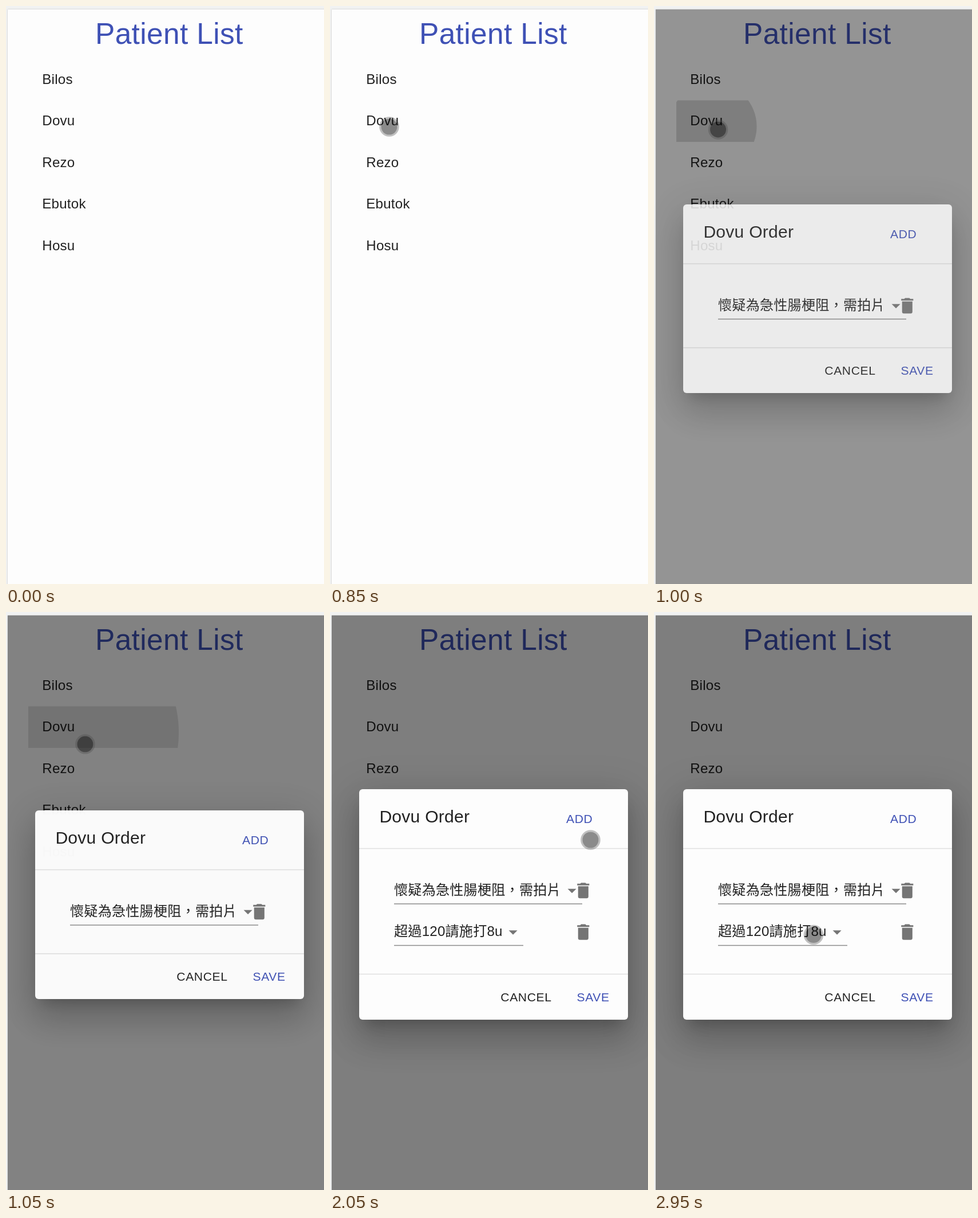
These frames come from a looping animation (556 by 1008 pixels, 3 s). An HTML page:

```html
<!DOCTYPE html>
<html lang="zh-Hant">
<head>
<meta charset="utf-8">
<title>Patient List</title>
<style>
  html, body { margin: 0; width: 100%; height: 100%; overflow: hidden; background: #f1f2f2; }
  body { position: relative; font-family: "Liberation Sans", "Noto Sans CJK TC", sans-serif; }
  svg { position: absolute; left: 0; top: 0; width: 556px; height: 1008px; overflow: visible; }
  #page, #backdrop { position: absolute; left: 2.5px; top: 5.5px; width: 600px; height: 1100px; }
  #page { background: #fdfdfd; box-shadow: 0 0 2px rgba(0,0,0,.25); }
  #backdrop { background: #000; }
  #dialog {
    position: absolute; left: 51px; width: 470px; border-radius: 6px; background: #fdfdfd;
    box-shadow: 0 16.6px 22.6px -10.5px rgba(0,0,0,.2), 0 36px 57px 4.5px rgba(0,0,0,.14),
      0 13.6px 69px 12px rgba(0,0,0,.12);
  }
  text { white-space: pre; fill: #000; fill-opacity: .87; }
  .title { font-size: 51.4px; letter-spacing: .00735em; }
  .body { font-size: 24.1px; letter-spacing: .00938em; }
  .head { font-size: 30.1px; letter-spacing: .0075em; }
  .button { font-size: 21.1px; letter-spacing: .02857em; }
  .light { font-weight: 300; }
  .primary { fill: #3f51b5; fill-opacity: 1; }
  .divider { stroke: #dfdfdf; stroke-width: 1.5; }
  .underline { stroke: #8c8c8c; stroke-width: 1.5; }
  .icon { fill: #757575; }
</style>
</head>
<body>
<div id="page"></div>
<svg>
  <clipPath id="row"><rect x="39" y="164.5" width="493" height="72.4"/></clipPath>
  <circle id="ripple" cx="103" cy="210" clip-path="url(#row)"/>
  <text class="title primary" x="156" y="66.3">Patient List</text>
  <g id="patients"></g>
</svg>
<div id="backdrop"></div>
<div id="dialog">
  <svg>
    <text class="head" x="35.4" y="58.3">Dovu Order</text>
    <text class="button primary" x="362" y="59">ADD</text>
    <path class="divider" d="M0 103.5H470"/>
    <g id="orders"></g>
    <g id="footer">
      <path class="divider" d="M0 -79H470"/>
      <text class="button" x="247.3" y="-31.8">CANCEL</text>
      <text class="button primary" x="380.5" y="-31.8">SAVE</text>
    </g>
  </svg>
</div>
<svg>
  <g id="pointer">
    <circle r="14" fill-opacity=".45"/>
    <circle r="15.6" fill="none" stroke="#4b4b4b" stroke-width="3.4" stroke-opacity=".34"/>
  </g>
</svg>
<script>
const $ = id => document.getElementById(id);
const ROW = 72.4, ADD_TIME = 1850;

$('patients').innerHTML = ['Bilos', 'Dovu', 'Rezo', 'Ebutok', 'Hosu']
  .map((name, i) => `<text class="body" x="63.3" y="${136 + i * ROW}">${name}</text>`).join('');

const icon = (x, d) =>
  `<path class="icon" transform="translate(${x} 158.7) scale(1.507)" d="${d}"/>`;
const order = (label, right, i) => `<g transform="translate(0 ${i * ROW})">
  <text class="body light" x="61" y="183.5">${label}</text>
  <path class="underline" d="M61 200H${right}"/>
  ${icon(right - 36, 'M7 10l5 5 5-5z')}
  ${icon(373.7, 'M6 21a2 2 0 0 0 2 2h8a2 2 0 0 0 2-2V7H6zM19 4h-3.5l-1-1h-5l-1 1H5v2h14z'.replace('M6 21a2 2 0 0 0 2 2', 'M6 19a2 2 0 0 0 2 2'))}
</g>`;
$('orders').innerHTML = order('懷疑為急性腸梗阻，需拍片', 390, 0) + order('超過120請施打8u', 287, 1);

// Progress of t from start to end, eased by cubic-bezier(.4, 0, .2, 1)
function ease(t, start, end) {
  const x = Math.min(1, Math.max(0, (t - start) / (end - start)));
  let lo = 0, hi = 1;
  for (let i = 0; i < 20; i++) {
    const s = (lo + hi) / 2, r = 1 - s;
    if (1.2 * s * r * r + .6 * s * s * r + s ** 3 < x) lo = s; else hi = s;
  }
  return lo * lo * (3 - 2 * lo);
}

// Each pointer move: start time, end time, destination
const moves = [
  [150, 350, 234, 217],
  [550, 850, 103.5, 210.5],
  [940, 1600, 513.5, 446],
  [1600, 2050, 455.5, 397.5],
  [2050, 2750, 229, 561],
  [2750, 2950, 279, 563]
];

function pointerAt(t) {
  let x = 333.5, y = 227.5;
  for (const [start, end, toX, toY] of moves) {
    const k = ease(t, start, end);
    x += (toX - x) * k;
    y += (toY - y) * k;
  }
  return [x, y];
}

function draw(now) {
  const t = Math.floor(now % 3000 / 50) * 50;

  const fade = ease(t, 890, 1090);
  $('backdrop').style.opacity = fade / 2;
  $('dialog').style.opacity = fade;

  $('ripple').setAttribute('r', 430 * ease(t, 900, 1347));
  $('ripple').setAttribute('fill-opacity', .167 * (1 - ease(t, 900, 1450)));

  const added = t >= ADD_TIME;
  const height = added ? 329 + ROW : 329;
  $('dialog').style.top = 510 - height / 2 + 'px';
  $('dialog').style.height = height + 'px';
  $('orders').lastElementChild.style.display = added ? '' : 'none';
  $('footer').setAttribute('transform', `translate(0 ${height})`);

  $('pointer').style.display = t < 150 ? 'none' : '';
  $('pointer').setAttribute('transform', `translate(${pointerAt(t)})`);
}

function tick() {
  draw(performance.now());
  requestAnimationFrame(tick);
}
tick();
</script>
</body>
</html>
```
